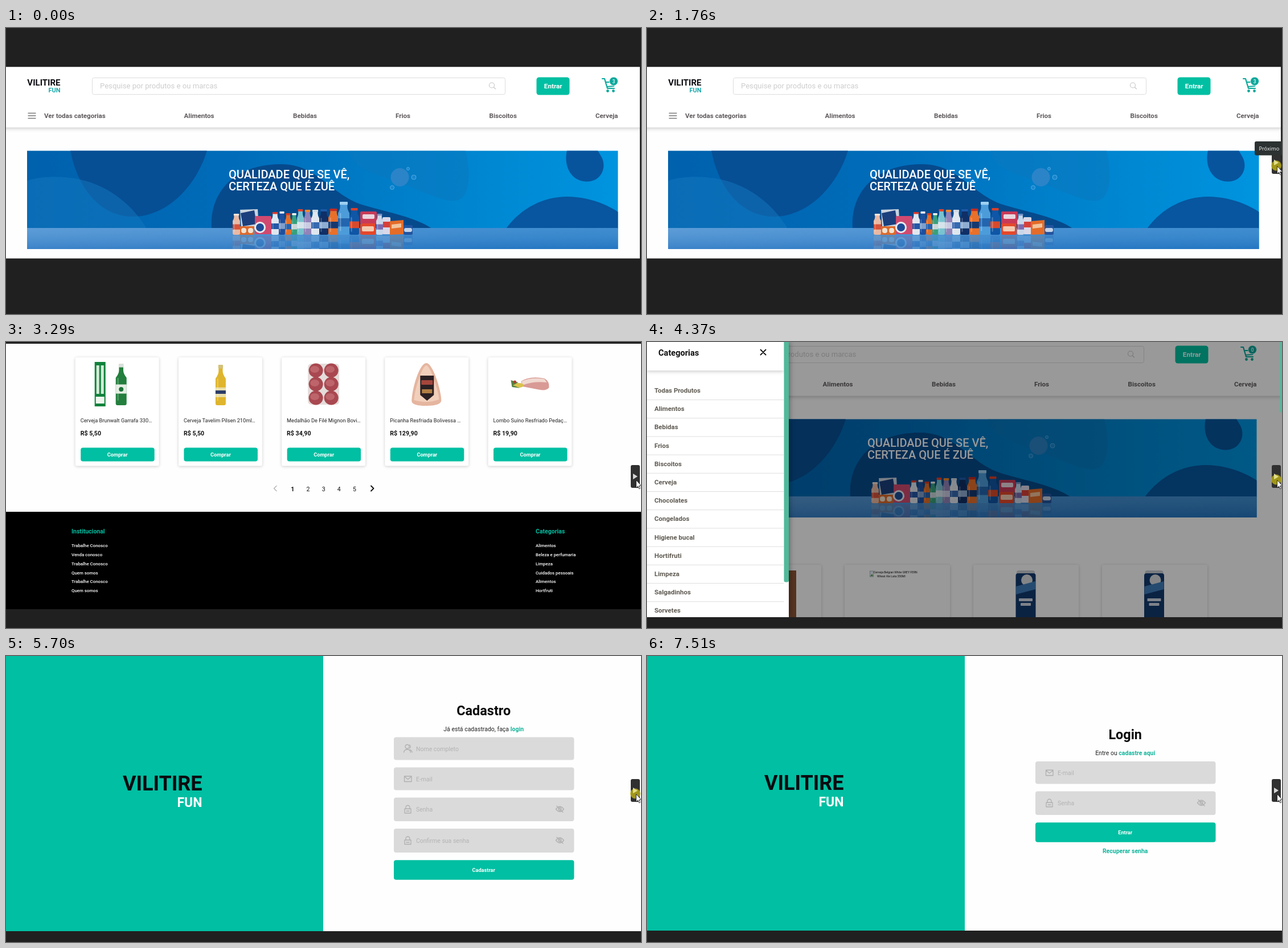
Write an HTML page that moves like this. It is 1115 by 502 pixels and loops after 8 s.

```html
<!DOCTYPE html>
<html lang="pt-BR">
<head>
<meta charset="utf-8">
<title>Loja</title>
<style>
html,body{margin:0;width:100%;height:100%;overflow:hidden;background:#202020}
#stage{position:relative;width:1115px;height:502px;overflow:hidden;background:#202020}
svg{display:block}
#reel,#viewer{position:absolute;left:0;top:0}
text{font-family:Roboto,Arial,sans-serif;white-space:pre}
.card{fill:#fff;filter:drop-shadow(0 1px 2.5px rgba(0,0,0,.2))}
.bar{fill:#fff;filter:drop-shadow(0 2px 3px rgba(0,0,0,.2))}
.icon{fill:none;stroke:#b0b0b0;stroke-width:1.3;stroke-linecap:round;stroke-linejoin:round}
#reel{animation:reel 8s step-end infinite}
#next{animation:next 8s step-end infinite}
#tip{animation:tip 8s step-end infinite}
#click{animation:click 8s step-end infinite}
#cursor{animation:move 8s linear infinite}
@keyframes reel{
  0%{transform:none}
  22.875%{transform:translateY(-502px)}
  38.75%{transform:translateY(-1004px)}
  54.625%{transform:translateY(-1506px)}
  71.25%{transform:translateY(-2008px)}
  87%,100%{transform:translateY(-2510px)}
}
@keyframes next{0%{opacity:0}12%,100%{opacity:1}}
@keyframes tip{0%{opacity:0}20.25%{opacity:1}24.6%,100%{opacity:0}}
@keyframes click{
  0%{opacity:0}
  21.125%{opacity:1}23.75%{opacity:0}
  37.875%{opacity:1}40.25%{opacity:0}
  54.625%{opacity:1}56.25%{opacity:0}
  70.375%{opacity:1}72.875%{opacity:0}
  86.125%{opacity:1}87.9%,100%{opacity:0}
}
@keyframes move{
  0%,8.37%{opacity:0;transform:translate(-58px,248px)}
  8.375%{opacity:1;transform:translate(-58px,248px);animation-timing-function:cubic-bezier(.3,.3,.4,1)}
  17.75%,100%{opacity:1;transform:none}
}
</style>
</head>
<body>
<div id="stage">
<svg id="reel" width="1115" height="3012"></svg>
<svg id="viewer" width="1115" height="502">
  <g id="next">
    <rect x="1097" y="216" width="16" height="40" rx="3" fill="#303030"/>
    <path d="M1101 231L1109 236L1101 241Z" fill="#d6d6d6"/>
  </g>
  <g id="click">
    <circle cx="1105" cy="241.5" r="9" fill="#b9ad16" opacity=".82"/>
    <path d="M1101 232L1109 236.5L1101 241Z" fill="#e4e08a"/>
  </g>
  <g id="tip">
    <rect x="1067" y="199" width="52" height="24.5" rx="3" fill="#2b3231"/>
    <text x="1074.5" y="214.5" font-size="9.2" font-weight="500" fill="#fff" style="font-family:'Open Sans',sans-serif">Próximo</text>
  </g>
  <path id="cursor" d="M1106.5 242.5V256L1109.6 253.2L1111.7 257.8L1113.7 256.9L1111.7 252.4H1115.7Z" fill="#fff" stroke="#111" stroke-width=".8"/>
</svg>
</div>
<script>
const TEAL = '#00bfa2';

const rect = (x, y, w, h, fill, r = 0, extra = '') =>
  `<rect x="${x}" y="${y}" width="${w}" height="${h}" rx="${r}" fill="${fill}" ${extra}/>`;
const circle = (x, y, r, fill, extra = '') => `<circle cx="${x}" cy="${y}" r="${r}" fill="${fill}" ${extra}/>`;
const oval = (x, y, rx, ry, fill) => `<ellipse cx="${x}" cy="${y}" rx="${rx}" ry="${ry}" fill="${fill}"/>`;
const path = (d, fill, extra = '') => `<path d="${d}" fill="${fill}" ${extra}/>`;
const icon = (d, extra = '') => `<path class="icon" d="${d}" ${extra}/>`;
const text = (x, y, s, size, fill = '#111', weight = 400, anchor = 'start', extra = '') =>
  `<text x="${x}" y="${y}" font-size="${size}" fill="${fill}" font-weight="${weight}" text-anchor="${anchor}" ${extra}>${s}</text>`;
const at = (x, y, body) => `<g transform="translate(${x} ${y})">${body}</g>`;
const scene = (i, body) => `<svg y="${i * 502}" width="1115" height="502" overflow="hidden">${body}</svg>`;

const wordmark = (x, y, size, small, gap, colour) =>
  text(x, y, 'VILITIRE', size, '#0a0a10', 700, 'end') +
  text(x, y + gap, 'FUN', small, colour, 700, 'end');

const bottle = (x, y, w, h, body, cap, label, top = .5, tall = .25, neck = .2) => {
  const c = x + w / 2, n = w * neck, s = y + h * .34;
  return path(`M${c - n} ${y + 2}H${c + n}V${y + h * .16}Q${c + n} ${y + h * .24} ${x + w} ${s}V${y + h - 3}q0 3 -3 3H${x + 3}q-3 0 -3 -3V${s}Q${c - n} ${y + h * .24} ${c - n} ${y + h * .16}Z`, body) +
    rect(c - n - .6, y, n * 2 + 1.2, h * .09, cap, 1) +
    rect(x, y + h * top, w, h * tall, label) +
    rect(x + w * .15, s, w * .12, h * .55, '#fff', 1, 'opacity=".25"');
};

// x, width, top, body, cap, label
const shelf = [
  [398, 13, 326, '#e9b9a4', '#f4e4da', '#d5533c'],
  [466, 13, 323, '#dfe6ee', '#d93a2a', '#2456a5'],
  [479, 11, 322, '#1d4f9f', '#e8eef5', '#7f9fcb'],
  [490, 11, 325, '#e5702a', '#d63b24', '#2a62ab'],
  [501, 10, 325, '#37a07c', '#ecf3ee', '#c9d5d6'],
  [511, 12, 318, '#78c3cf', '#e0412b', '#d5e3ea'],
  [523, 13, 319, '#9184b8', '#f08a2c', '#c9cbe2'],
  [536, 14, 319, '#dfe6ee', '#cfd8e2', '#3669b0'],
  [550, 16, 318, '#102f66', '#1d59a8', '#8fadd3'],
  [566, 18, 317, '#e8702a', '#c22c22', '#15396f'],
  [583, 20, 305, '#4d9cda', '#9ed0f2', '#2365af'],
  [603, 17, 316, '#0f56a6', '#dc402a', '#d94a2c'],
  [650, 12, 326, '#c9d7ea', '#7891c4', '#7a6bb0']
];
const boxes = path('M411 319L442 318L444 352L413 354Z', '#c9d3de') + path('M412 325L436 320L440 344L416 348Z', '#1b3f7c') +
  rect(409, 348, 27, 15, '#dd6a2b', 1) + rect(413, 351, 9, 9, '#efe2d2', 4) + rect(425, 351, 9, 9, '#efe2d2', 4) +
  rect(437, 330, 29, 32, '#cf4a70', 2) + circle(446, 350, 10, '#e8ecf2') + circle(446, 350, 7, '#1d4c97') +
  rect(622, 322, 29, 22, '#c83a58', 2) + rect(626, 327, 21, 8, '#ead6df', 2) +
  rect(622, 343, 27, 20, '#e4472b', 2) + rect(625, 348, 21, 9, '#f3c9b0', 2) +
  rect(661, 332, 14, 30, '#d9d8e8', 2) + rect(661, 340, 14, 10, '#d6403a') +
  path('M674 339L698 337V362L674 363Z', '#e46c28') + path('M677 345L694 343V350L677 352Z', '#f2c39b') +
  rect(698, 346, 16, 17, '#23549f', 2) + rect(699, 351, 14, 7, '#c3d3e8', 3);
const products = boxes + shelf.map(([x, w, y, ...c]) => bottle(x, y, w, 363 - y, ...c, .5, .25, .32)).join('');

const slogan = (y, s) => text(391, y, s, 20, '#fff', 500);
const bubble = (x, y, r) => circle(x, y, r, '#1a86cf', 'stroke="#5db4e8" stroke-width=".8"');
const banner = `<g clip-path="url(#frame)">` +
  rect(37, 215, 1038, 173, 'url(#sea)') +
  path('M113 215C125 280 165 331 222 331C285 331 335 275 353 215Z', '#064f95') +
  path('M37 268C60 261 95 258 130 266C185 278 225 315 247 352H37Z', '#1579c0', 'opacity=".5"') +
  path('M603 215C605 245 650 258 700 275C735 288 765 305 790 303C815 300 817 255 807 215Z', '#0a78bf', 'opacity=".55"') +
  path('M361 352C357 287 402 239 483 239C548 239 572 295 628 311C676 325 718 332 748 352Z', '#064a8c') +
  path('M985 215C979 240 990 269 1020 269.5C1043 270 1056 247 1046 227L1039 215Z', '#07549d') +
  path('M878 352C905 315 945 296 985 296C1020 296 1052 308 1075 323V352Z', '#07569f') +
  rect(37, 351, 1038, 37, 'url(#floor)') + rect(37, 351, 1038, 37, 'url(#shade)') +
  `<g transform="matrix(1 0 0 -1 0 727)" opacity=".16">${products}</g>` + products + '</g>' +
  slogan(263.5, 'QUALIDADE QUE SE VÊ,') + slogan(284.5, 'CERTEZA QUE É ZUÊ') +
  circle(691.5, 262, 16, '#2b84c8') + bubble(706, 247, 2.5) + bubble(716, 262, 4) + bubble(678, 280, 3.5);

const home = (count, w, h) => `<svg width="${w}" height="600" overflow="hidden">` +
  rect(0, 68.5, w, h, '#fefefe') +
  `<rect class="bar" x="-6" y="68.5" width="${w + 12}" height="106"/>` +
  wordmark(95.5, 101, 15, 11, 12, '#18a9ac') +
  rect(151.5, 87.5, 725, 29, '#fff', 3, 'stroke="#dcdcdc"') +
  text(165, 105.7, 'Pesquise por produtos e ou marcas', 13.1, '#cdcdcd') +
  icon('M857.5 100.5a4.5 4.5 0 1 1 -9 0a4.5 4.5 0 1 1 9 0M856.5 104L859.5 107', 'style="stroke:#c4c4c4;stroke-width:1.1"') +
  rect(931.5, 86.5, 58, 31, TEAL, 4.5) +
  text(960.7, 106, 'Entrar', 11.7, '#fff', 700, 'middle') +
  icon('M1047 89H1051L1056 106H1068M1053 95H1070L1067 102L1055 103', 'style="stroke:#0aa89b;stroke-width:2.2"') +
  circle(1056.5, 110.5, 2.4, '#0aa89b') + circle(1066.5, 110.5, 2.4, '#0aa89b') +
  circle(1067, 93.5, 7.5, '#0aa89b', 'stroke="#fff" stroke-width=".8"') +
  text(1067, 96.5, count, 8.2, '#fff', 500, 'middle') +
  icon('M39 149.5H52M39 154H52M39 158.5H52', 'style="stroke:#777"') +
  [['Ver todas categorias', 67], ['Alimentos', 312.5], ['Bebidas', 504], ['Frios', 684], ['Biscoitos', 848.5], ['Cerveja', 1035]]
    .map(([s, x]) => text(x, 158, s, 11.6, '#5f5a5c', 700)).join('') +
  banner + '</svg>';

// Product pictures, in the card's own coordinates
const pics = {
  tub: rect(40, 24, 62, 8, '#f4efdb', 3) + path('M41 32H101L96 70H46Z', '#f0dfa0') + oval(73, 44, 21, 9, '#fff') + oval(73, 44, 18, 7, '#d3242c') + rect(62, 55, 24, 5, '#74a348', 2) + circle(90, 62, 5, '#f4f0e0'),
  box: rect(47, 11, 53, 17, '#15225c', 4) + rect(44, 26, 61, 58, '#24459b', 5) + path('M44 42Q75 26 105 42V62Q75 72 44 62Z', '#153078') + oval(74, 50, 18, 10, '#e9f0fa') + rect(54, 69, 40, 7, '#dce5f2', 2) + circle(95, 61, 5, '#d23945'),
  powder: rect(37, 28, 74, 40, '#f5f6f4') + path('M37 55Q65 45 86 56V68H37Z', '#d4222f') + rect(50, 35, 29, 18, '#2a57a8', 5) + path('M40 34L55 31L52 49Z', '#3e9b63') + rect(87, 28, 12, 40, '#234b9d') + rect(99, 28, 12, 40, '#f0c52e') + rect(101, 29, 9, 7, '#d73a26'),
  clear: bottle(64, 15, 18, 64, '#c6d9e4', '#3b8fd0', '#7fa9c8', .5, .3) + rect(66, 48, 14, 9, '#245f9f', 2),
  spray: bottle(64, 10, 20, 76, '#c9ccd1', '#d2332b', '#f0f1f2', .42, .4) + rect(66, 25, 16, 12, '#f0a33c', 2) + circle(74, 48, 7, '#2a55a3') + rect(65, 65, 18, 6, '#446fae'),
  cola: bottle(64, 10, 20, 74, '#33201b', '#20242c', '#16171b', .4, .25) + circle(74, 48, 5, '#2a62b0'),
  soda: bottle(62, 10, 22, 74, '#38201b', '#151515', '#dc2027', .4, .25) + rect(64, 46, 18, 4, '#1d1414'),
  grape: rect(64, 11, 20, 8, '#3f9b45', 2) + rect(59, 18, 30, 65, '#34202c', 7) + rect(61, 48, 26, 24, '#f0efe6', 2) + circle(74, 65, 5, '#453155') + rect(65, 52, 18, 4, '#466b3a', 2),
  orange: rect(66, 10, 15, 15, '#3f9b45', 2) + rect(62, 24, 23, 59, '#eaa42d', 6) + rect(63, 47, 21, 27, '#f5ecd0', 2) + circle(73, 62, 7, '#ef9b22') + rect(67, 50, 13, 4, '#456d35', 2),
  lager: rect(58, 14, 30, 66, '#c2c6c4', 5) + rect(57, 18, 32, 58, '#23843a', 4) + circle(73, 40, 8, '#d3302c') + rect(57, 54, 32, 12, '#e5eee2') + rect(61, 58, 24, 4, '#23843a'),
  pair: rect(34, 8, 19, 78, '#11823c') + rect(37, 14, 5, 50, '#d8ebd9') + rect(45, 14, 5, 50, '#d8ebd9') + rect(36, 69, 15, 12, '#eef6ee') + bottle(71, 11, 19, 73, '#237f3d', '#d9dfd9', '#e3ede1', .5, .22) + circle(80.5, 56, 4, '#1b7437'),
  pilsen: bottle(65, 13, 18, 71, '#dfb52d', '#d3c17a', '#eadfa9', .56, .24) + rect(65, 58, 18, 6, '#2c3d69'),
  meat: rect(46, 11, 55, 72, '#e4dcda', 6) + [0, 1, 2, 3, 4, 5].map(i => { const x = 60 + i % 2 * 27, y = 23 + (i >> 1) * 24; return circle(x, y, 12.5, '#a94850') + oval(x - 2, y - 2, 8, 6, '#bd656b'); }).join(''),
  rump: path('M73 10C84 10 99 58 99 76Q98 85 73 85Q48 85 47 77C47 58 60 10 73 10Z', '#e5b59f') + path('M73 14C80 15 94 58 95 74Q73 82 51 75C52 58 65 14 73 14Z', '#f1cfbb') + path('M62 32H86V66L74 76L62 66Z', '#2b2023') + rect(64, 40, 20, 8, '#a5463c', 1) + rect(65, 56, 18, 7, '#b17e44'),
  loin: path('M58 42Q73 32 99 37Q108 42 107 53Q102 60 86 56L60 51Z', '#d99a95') + path('M59 42Q75 34 99 38L103 44Q80 41 60 49Z', '#f0d9d0') + oval(54, 49, 9, 4, '#d9c24c') + path('M40 40L53 44L44 49L56 54L42 52Z', '#568341') + circle(47, 43, 2.5, '#b53b31')
};

const card = (x, y, [pic, name, price]) => at(x, y,
  '<rect class="card" width="147" height="190.5" rx="3"/>' + pics[pic] +
  text(9, 114, name, 9.2, '#222') + text(9, 137, 'R$ ' + price, 10.6, '#111', 700) +
  rect(9.5, 158.5, 129.5, 24, TEAL, 4) + text(74, 173.7, 'Comprar', 9.2, '#fff', 700, 'middle'));
const row = (x, y, items) => items.map((p, i) => card(x + i * 181.2, y, p)).join('');

const rows = [
  [['tub', 'Sorvete Trilobim Fubel Crem…', '29,90'], ['box', 'Lava-Louças Pó para Máquina…', '29,90'],
   ['powder', 'Sabão em Pó Azu Lavagem …', '34,50'], ['clear', 'Detergente Líquido ZUÊ Clear …', '2,50'],
   ['spray', 'Tira Limo Noga Banheiro Z27 5…', '13,99']],
  [['cola', 'Refrigerante Cola Zero Açúcar…', '3,99'], ['soda', 'Refrigerante Zuni-Brás Sem A…', '4,99'],
   ['grape', 'Suco Uva e Maçã Frutael Eda …', '9,98'], ['orange', 'Suco Integral Laranja Frutael …', '9,98'],
   ['lager', 'Cerveja Lager Puro Malte Bru…', '3,79']],
  [['pair', 'Cerveja Brunwalt Garrafa 330…', '5,50'], ['pilsen', 'Cerveja Tavelim Pilsen 210ml…', '5,50'],
   ['meat', 'Medalhão De Filé Mignon Bovi…', '34,90'], ['rump', 'Picanha Resfriada Bolivessa …', '129,90'],
   ['loin', 'Lombo Suíno Resfriado Pedaç…', '19,90']]
];

const listing = rect(0, 0, 1112, 483, '#fefefe') +
  text(118, 34.5, 'Todos os Produtos', 15.6, '#111', 700) + row(125, 58, rows[0]) + row(125, 282.5, rows[1]);

const column = (x, title, links) => text(x, 336, title, 10.5, TEAL, 700) +
  links.map((s, i) => text(x, 360 + i * 15.85, s, 7.85, '#fff', 500)).join('');
const pages = rect(0, 3, 1115, 295, '#fefefe') + row(121.7, 27, rows[2]) +
  icon('M475 252.5L470.5 257L475 261.5') +
  icon('M641 252.5L645.5 257L641 261.5', 'style="stroke:#111;stroke-width:1.8"') +
  [1, 2, 3, 4, 5].map(n => text(476 + n * 27.2, 261.7, n, 10.5, '#111', n > 1 ? 400 : 700, 'middle')).join('') +
  rect(0, 298, 1115, 171, '#000') +
  column(115, 'Institucional', ['Trabalhe Conosco', 'Venda conosco', 'Trabalhe Conosco', 'Quem somos', 'Trabalhe Conosco', 'Quem somos']) +
  column(930, 'Categorias', ['Alimentos', 'Beleza e perfumaria', 'Limpeza', 'Cuidados pessoais', 'Alimentos', 'Hortfruti']);

const can = x => rect(x - 16, 401, 32, 90, '#c9ced3', 4) + rect(x - 17.5, 406, 35, 90, '#123a70', 4) +
  circle(x + 2, 418, 10, '#d9dde0') + path(`M${x - 17} 429L${x + 17} 420V434L${x - 17} 443Z`, '#3f7dbb') +
  rect(x - 12, 450, 24, 5, '#cfd8e4', 1) + rect(x - 9, 458, 18, 5, '#cfd8e4', 1);
const items = ['Todas Produtos', 'Alimentos', 'Bebidas', 'Frios', 'Biscoitos', 'Cerveja', 'Chocolates', 'Congelados', 'Higiene bucal', 'Hortifruti', 'Limpeza', 'Salgadinhos', 'Sorvetes'];
const menu = rect(0, 0, 1115, 483, '#fefefe') + at(-4, -80, home(0, 1120, 500)) +
  [121, 347, 573, 799].map(x => `<rect class="card" x="${x}" y="391" width="185" height="130" rx="3"/>`).join('') +
  rect(200, 401, 62, 90, '#8f5535') +
  rect(391.5, 402, 6, 10, '#e9f0f6', 0, 'stroke="#789" stroke-width=".6"') + path('M392 411L395 407L397 411Z', '#51a351') +
  text(398, 406.3, 'Cerveja Belgian White GREY FERN', 5.1) + text(404, 413.3, 'Wheat Ale Lata 350Ml', 5.1) +
  can(665) + can(890.5) +
  rect(0, 0, 1115, 483, '#000', 0, 'opacity=".4"') + rect(1111.5, -8, 8, 132, '#50b99a', 3) +
  rect(0, 0, 249, 483, '#fff', 0, 'style="filter:drop-shadow(2px 0 4px #0005)"') +
  '<rect class="bar" x="0" y="-10" width="240" height="60"/>' +
  rect(240.5, -8, 8.5, 429.5, '#50b99a', 3) +
  text(20, 23.5, 'Categorias', 14.6, '#111', 700) +
  icon('M199.5 13.5L208.5 22.5M208.5 13.5L199.5 22.5', 'style="stroke:#111;stroke-width:1.8"') +
  items.map((s, i) => text(13, 89 + i * 32.2, s, 11.5, '#5f5a52', 700) +
    rect(0, 101 + i * 32.2, 240.5, 1, '#dedede')).join('') +
  rect(0, 483, 1115, 19, '#202020');

const glyph = {
  user: 'M2.5 -3.5a3.5 3.5 0 1 1 -7 0a3.5 3.5 0 1 1 7 0M-7 6.5Q-6 1.5 -1 1.5T5 6.5M3 -6.5A3.5 3.5 0 0 1 3 -.5M4 2Q7 3 7.5 6.5',
  mail: 'M-6 -4.5H6.5V5H-6ZM-6 -4L.2 1L6.5 -4',
  lock: 'M-5.5 -1H5.5V6.5H-5.5ZM-3.5 -1V-3.5A3.5 3.5 0 0 1 3.5 -3.5V-1M-2.5 3H2.5',
  eye: 'M-7 0Q0 -9 7 0Q0 9 -7 0ZM2.5 0a2.5 2.5 0 1 1 -5 0a2.5 2.5 0 1 1 5 0M-5.5 -5.5L5.5 5.5'
};
const field = (y, h, pic, label) => rect(681, y, 316.5, h, '#dadada', 4) +
  at(705.5, y + h / 2, icon(glyph[pic])) + text(720, y + h / 2 + 4, label, 10.5, '#b3b3b3') +
  (pic === 'lock' ? at(972.5, y + h / 2 - .5, icon(glyph.eye)) : '');
const form = (x, h, title, y, lead, link, fields, action, by) =>
  rect(0, 0, 1115, h, '#fefefe') + rect(0, 0, 557 + x, h, TEAL) +
  at(x, 0, wordmark(344.5, 235.5 - x, 36, 23, 29, '#fff') +
    text(838.7, y, title, 23.4, '#0a0a0a', 700, 'middle') +
    text(838.7, y + 28, `${lead} <tspan font-weight="700" fill="#10b59c">${link}</tspan>`, 10.5, '#222', 400, 'middle') +
    fields.map(f => field(...f)).join('') +
    rect(681, by, 316.5, 34.5, TEAL, 4) + text(838.7, by + 20.5, action, 9.2, '#fff', 700, 'middle'));

const signUp = form(0, 483, 'Cadastro', 103.7, 'Já está cadastrado, faça', 'login',
  [[142.5, 40, 'user', 'Nome completo'], [195.5, 40, 'mail', 'E-mail'], [248.5, 41.5, 'lock', 'Senha'], [303, 42, 'lock', 'Confirme sua senha']],
  'Cadastrar', 358.3);
const signIn = form(1, 482, 'Login', 145.5, 'Entre ou', 'cadastre aqui',
  [[185, 39.5, 'mail', 'E-mail'], [237.5, 41.5, 'lock', 'Senha']], 'Entrar', 292.3) +
  text(839.7, 345.5, 'Recuperar senha', 10.5, '#10b59c', 700, 'middle');

const stops = list => list.map(([o, c]) => `<stop offset="${o}" stop-color="${c}"/>`).join('');
const defs = `<defs>
<linearGradient id="sea">${stops([[0, '#0061ad'], [.35, '#006cb9'], [.7, '#0083cd'], [1, '#0094df']])}</linearGradient>
<linearGradient id="floor">${stops([[0, '#4f93d2'], [.4, '#428bcf'], [.75, '#2f82ca'], [1, '#2b80c9']])}</linearGradient>
<linearGradient id="shade" x2="0" y2="1"><stop offset="0" stop-color="#8fc0ea" stop-opacity=".2"/><stop offset="1" stop-color="#1563b4" stop-opacity=".35"/></linearGradient>
<clipPath id="frame"><rect x="37" y="215.5" width="1037.5" height="172.5"/></clipPath></defs>`;

document.getElementById('reel').innerHTML = defs +
  [home(3, 1113, 336), listing, pages, menu, signUp, signIn].map((s, i) => scene(i, s)).join('');
</script>
</body>
</html>
```
